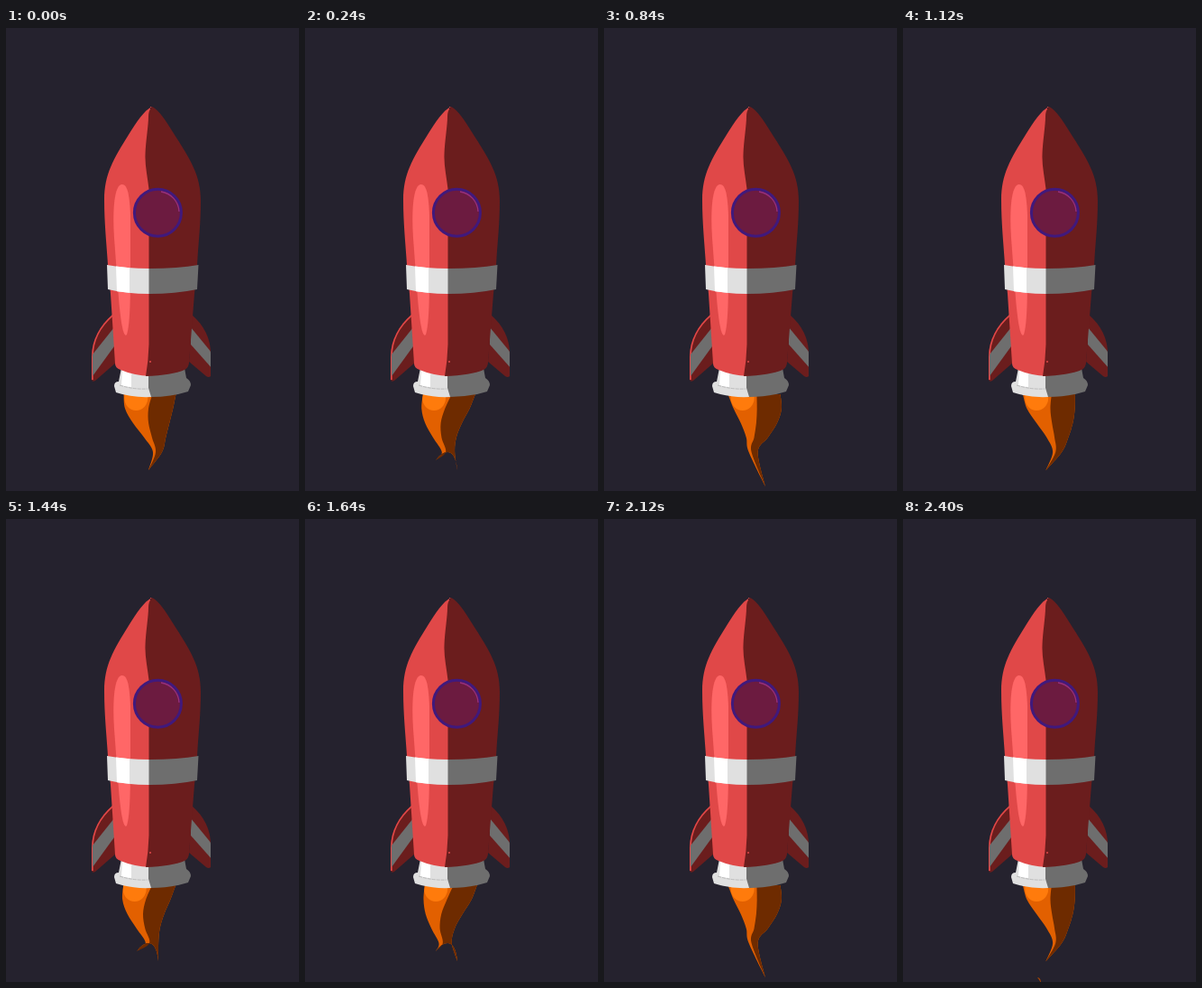
An HTML page that plays this animation: 325x512 px, repeating every 2.44 s.

```html
<!DOCTYPE html>
<html lang="en">
<head>
<meta charset="utf-8">
<title>Rocket</title>
<style>
  html, body { margin: 0; width: 100%; height: 100%; overflow: hidden; background: #25222e; }
  svg { display: block; width: 325px; height: 512px; }
  .red { fill: #e04848; }
  .maroon { fill: #6b1d1d; }
  .white { fill: #e0e0e0; }
  .shine { fill: #fff; }
  .gray { fill: #6e6e6e; }
</style>
</head>
<body>
<svg viewBox="0 0 325 512">
  <defs>
    <clipPath id="flameClip"><path id="clip"/></clipPath>
    <clipPath id="leftFin"><path d="M118 317C104 329 95 345 95 364V389Q96 392 99 390L122 370Z"/></clipPath>
    <clipPath id="rightFin"><path d="M206 317C220 329 227 344 227 360V385Q225 387 222 385L203 369Z"/></clipPath>
  </defs>

  <path id="body" fill="#e26000"/>
  <ellipse id="glow" cy="409" rx="13" ry="14" fill="#ff7b0c" clip-path="url(#flameClip)"/>
  <path id="shade" fill="#6e2b00"/>
  <path id="wisp" d="M149 507Q153 507 153 514Q152 510 149 507Z" fill="#b34a00"/>

  <g clip-path="url(#leftFin)">
    <path class="maroon" d="M90 310H125V395H90Z"/>
    <path d="M118 317C104 329 95 345 95 364V389" fill="none" stroke="#e04848" stroke-width="3.5"/>
    <path class="gray" d="M96 361L120 331V352L96 385Z"/>
  </g>
  <g clip-path="url(#rightFin)">
    <path class="maroon" d="M200 310H230V395H200Z"/>
    <path class="gray" d="M205 331L228 359V376L205 350Z"/>
  </g>

  <path class="white" d="M128 376L125 391Q120 391 120 396L122 403Q140 409 161 408V376Z"/>
  <path class="shine" d="M129 378H139V397Q133 397 128 395Z"/>
  <path class="gray" d="M158 376H198L200 387Q205 390 205 395L202 402Q183 408 161 408L158 398Z"/>
  <path d="M126 395Q142 400 157 399" fill="none" stroke="#bcbcbc" stroke-dasharray="4 1"/>

  <path class="red" d="M162 87C153 91 145 104 136 118C119 145 109 162 109 190C109 218 112 243 113 263L116 294L121 371Q121 376 127 378Q141 384 160 385V87Z"/>
  <path class="maroon" d="M162 87C170 91 177 102 185 115C205 146 216 163 216 191C216 219 213 242 212 263L209 294L203 370Q203 375 198 378Q184 384 155 385Q158 368 158.5 350V178C157 165 154 152 154.5 140C155 125 158 108 158 98Q158 91 162 87Z"/>
  <path d="M128 173C135 172 137 185 138 207V262C138 292 138 326 134 339C130 344 127 322 125 299L120 232C118 202 120 175 128 173Z" fill="#ff6767"/>
  <circle cx="160" cy="369" r="1" class="red"/>

  <path class="white" d="M112 262Q134 266 159 266V294Q134 294 113 289Z"/>
  <path class="shine" d="M122 263.5L137 265.2V292.8L123 291.2Z"/>
  <path class="gray" d="M158.5 266Q191 266 213.5 262L212 289Q188 294 158.5 294Z"/>

  <circle cx="168.4" cy="204.2" r="26" fill="#6c1b40" stroke="#40197c" stroke-width="3"/>
  <path d="M172 181A23.5 23.5 0 0 1 192 203" fill="none" stroke="#96307d" stroke-width="1.3"/>
</svg>

<script>
const STEP = 40, LOOP = 2440, CYCLE = 1280, WISP_START = 2280;
const TOP = 405, LENGTH = 85, ROWS = 5, ROW_GAP = 16;

const el = id => document.getElementById(id);
const pt = p => p.map(v => v.toFixed(1)).join(' ');
const wave = turns => Math.cos(2 * Math.PI * turns);
const clamp = v => Math.min(1, Math.max(0, v));

// Smooth curve through points, continuing from the first one
function curve(pts) {
  let d = '';
  for (let i = 0; i < pts.length - 1; i++) {
    const p = pts[i], q = pts[i + 1];
    const before = pts[i - 1] || p, after = pts[i + 2] || q;
    const c1 = p.map((v, n) => v + (q[n] - before[n]) / 6);
    const c2 = q.map((v, n) => v - (after[n] - p[n]) / 6);
    d += `C${pt(c1)} ${pt(c2)} ${pt(q)}`;
  }
  return d;
}

function draw(t) {
  const phase = t / CYCLE;
  const fork = clamp(2 * wave(phase - 0.28));             // tip splits in two
  const flick = Math.max(0, wave(phase - 0.68)) ** 4;     // tip whips out to the right

  // A sway travels down the flame while it narrows
  const left = [], right = [], edge = [];
  for (let i = 0; i < ROWS; i++) {
    const s = i * ROW_GAP, u = s / LENGTH, y = TOP + s;
    const sway = (4 + 6 * Math.sin(Math.PI * u)) * wave(phase - 0.58 - s * 0.0043);
    const half = 14.5 * (1 + Math.cos(Math.PI * u)) + (2 + 5 * fork) * u ** 3;
    const x = 163 + sway;
    left.push([x - half, y]);
    right.unshift([x + half, y]);
    edge.push([x - half + 2 * half * (0.55 - 0.33 * u), y]);
  }

  const tipX = 158 + 22 * flick, tipY = 489 + 19 * flick;
  const tipA = [tipX - 13 * fork, tipY - 11 * fork];
  const notch = [tipX, tipY - 20 * fork];
  const tipB = [tipX + 11 * fork, tipY];

  const rest = `Q${pt([(tipA[0] + notch[0]) / 2, notch[1]])} ${pt(notch)}` +
    `Q${pt([tipB[0] - 2, notch[1]])} ${pt(tipB)}` + curve([tipB, ...right]) + 'Z';
  const outline = `M${pt(left[0])}` + curve([...left, tipA]) + rest;

  el('body').setAttribute('d', outline);
  el('clip').setAttribute('d', outline);
  el('shade').setAttribute('d', `M${pt(edge[0])}` + curve([...edge, tipA]) + rest);
  el('glow').setAttribute('cx', (left[0][0] + left[1][0]) / 2 + 13);

  const fall = (t - WISP_START) / 120;
  el('wisp').setAttribute('visibility', fall < 0 ? 'hidden' : 'visible');
  el('wisp').setAttribute('transform', `translate(0 ${14 * (fall - 1)})`);
}

const begin = performance.now();
function tick() {
  const t = (performance.now() - begin) % LOOP;
  draw(Math.floor(t / STEP) * STEP);
  requestAnimationFrame(tick);
}
tick();
</script>
</body>
</html>
```
